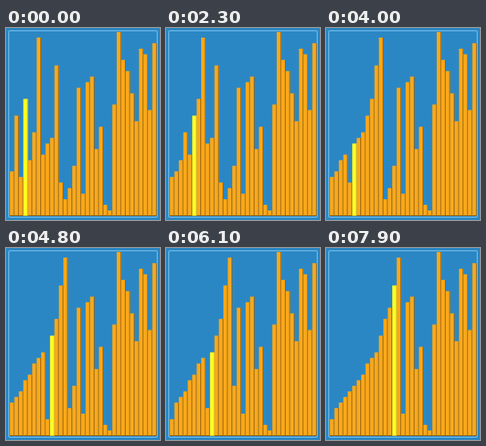
Animation of 193 by 240 pixels, one loop 8000 ms. Source, as a matplotlib script:

```python
import matplotlib.pyplot as plt
from matplotlib.animation import FuncAnimation
from matplotlib.patches import FancyBboxPatch, Rectangle

W, H, DPI = 193, 240, 64
LEFT, RIGHT, TOP, BASE = 5, 189, 5, 235
HOLD, FRAMES = 15, 80

BLUE, FRAME_LINE = "#2b87c4", "#7cc4ee"
# body, shaded edge
ORANGE = ("#f9a81b", "#94610f")
YELLOW = ("#ffff24", "#d6c81c")

VALUES = [8, 18, 21, 7, 10, 15, 32, 11, 13, 14, 27, 6, 3, 5, 9, 23, 4,
          24, 25, 12, 16, 2, 1, 20, 33, 28, 26, 22, 17, 30, 29, 19, 31]
PITCH = (RIGHT - LEFT) / len(VALUES)
UNIT = (BASE - TOP) / max(VALUES)


def insertion_steps(values, count):
    """Return (array, highlighted index) after each of the first swaps."""
    a, steps = list(values), []
    for i in range(1, len(a)):
        j = i
        while j > 0 and a[j - 1] > a[j]:
            a[j - 1], a[j] = a[j], a[j - 1]
            steps.append((a[:], j))
            if len(steps) == count:
                return steps
            j -= 1
    return steps


class Bar:
    def __init__(self, ax, index):
        x = LEFT + PITCH * index
        self.body = Rectangle((x, BASE), PITCH, 0)
        self.side = Rectangle((x + PITCH - 1, BASE), 1, 0)
        self.foot = Rectangle((x, BASE), PITCH, -1)
        for part in (self.body, self.side, self.foot):
            part.set(linewidth=0, snap=False)
            ax.add_patch(part)

    def set(self, value, colors):
        body, shade = colors
        self.body.set(height=-UNIT * value, facecolor=body)
        self.side.set(height=-UNIT * value, facecolor=shade)
        self.foot.set(facecolor=shade)


plt.rcParams["toolbar"] = "None"
fig = plt.figure(figsize=(W / DPI, H / DPI), dpi=DPI, facecolor=BLUE)
ax = fig.add_axes([0, 0, 1, 1])
ax.set_xlim(0, W)
ax.set_ylim(H, 0)
ax.axis("off")
ax.add_patch(FancyBboxPatch((3.5, 3.5), 186, 233, fc="none", ec=FRAME_LINE,
                            boxstyle="round,pad=0,rounding_size=1.5",
                            lw=72 / DPI))

steps = insertion_steps(VALUES, FRAMES - HOLD + 1)
bars = [Bar(ax, i) for i in range(len(VALUES))]


def draw(frame):
    array, active = steps[max(0, frame - HOLD + 1)]
    for i, (bar, value) in enumerate(zip(bars, array)):
        bar.set(value, YELLOW if i == active else ORANGE)
    return []


anim = FuncAnimation(fig, draw, frames=FRAMES, interval=100,
                     init_func=lambda: draw(0), repeat=True, repeat_delay=0)
plt.show()
```
